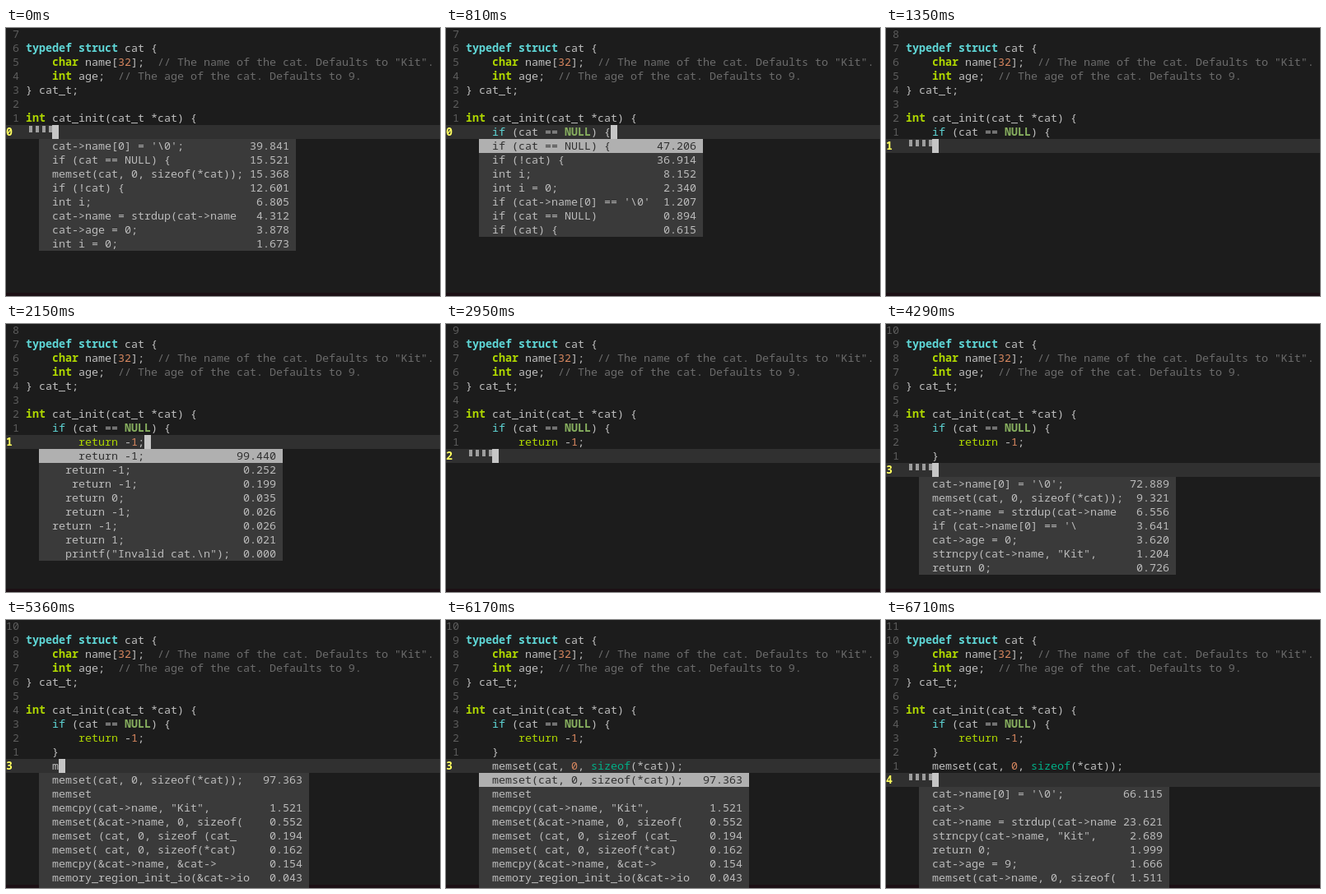
Write an HTML page that moves like this. It is 527x326 px and loops after 8 s.

```html
<!DOCTYPE html>
<html lang="en">
<head>
<meta charset="utf-8">
<title>Code completion</title>
<style>
  html, body { margin: 0; width: 100%; height: 100%; overflow: hidden; background: #1c1c1c; }
  #stage {
    position: relative; width: 527px; height: 326px; overflow: hidden;
    background: #1c1c1c; color: #c0c0c0;
    font: 13.333px/17px "Noto Sans Mono", "DejaVu Sans Mono", monospace;
    font-variant-ligatures: none;
  }
  #stage div { position: absolute; height: 17px; white-space: pre; }
  .status { left: 0; top: 322px; width: 527px; background: #1c1015; }
  .current { left: 0; width: 527px; background: #303030; }
  .num { color: #5c5c5c; }
  .num.now { color: #ffff5f; font-weight: bold; }
  #stage .guide { width: 4px; height: 8px; background: #9e9e9e; }
  .cursor { width: 8px; background: #c6c6c6; }
  .item { background: #3a3a3a; color: #bcbcbc; }
  .item.on { background: #b0b0b0; color: #303030; }
  .decl { color: #5fd7d7; font-weight: bold; }
  .type { color: #afd700; font-weight: bold; }
  .ret { color: #afd700; }
  .cond { color: #5fd7d7; }
  .const { color: #87af5f; font-weight: bold; }
  .op { color: #00af87; }
  .lit { color: #d7875f; }
  .note { color: #6c6c6c; }
</style>
</head>
<body>
<div id="stage"></div>
<script>
const CELL = 8, ROW = 17, TOP = -1, LEFT = 24, LOOP = 8000;
const stage = document.getElementById("stage");

const code = `
typedef struct cat {
    char name[32];  // The name of the cat. Defaults to "Kit".
    int age;  // The age of the cat. Defaults to 9.
} cat_t;

int cat_init(cat_t *cat) {
    if (cat == NULL) {
        return -1;
    }
    memset(cat, 0, sizeof(*cat));`.split("\n");

// col: left edge, cols: width, list: "completion|score"
const menu = (col, cols, text) => ({ col, cols, list: text.split("\n").slice(1) });

const menus = {
  body: menu(2, 39, String.raw`
cat->name[0] = '\0';|39.841
if (cat == NULL) {|15.521
memset(cat, 0, sizeof(*cat));|15.368
if (!cat) {|12.601
int i;|6.805
cat->name = strdup(cat->name|4.312
cat->age = 0;|3.878
int i = 0;|1.673`),
  cond: menu(2, 34, String.raw`
if (cat == NULL) {|47.206
if (!cat) {|36.914
int i;|8.152
int i = 0;|2.340
if (cat->name[0] == '\0'|1.207
if (cat == NULL)|0.894
if (cat) {|0.615`),
  ret: menu(2, 37, String.raw`
    return -1;|99.440
  return -1;|0.252
   return -1;|0.199
  return 0;|0.035
  return -1;|0.026
return -1;|0.026
  return 1;|0.021
  printf("Invalid cat.\n");|0.000`),
  inner: menu(6, 19, `
}|98.127
return 0;|0.412
return;|0.238
exit(1);|0.104`),
  close: menu(2, 36, `
}|99.318
cat->name = strdup("Kit");|0.146
return 0;|0.092
} else {|0.071`),
  after: menu(2, 39, String.raw`
cat->name[0] = '\0';|72.889
memset(cat, 0, sizeof(*cat));|9.321
cat->name = strdup(cat->name|6.556
if (cat->name[0] == '\|3.641
cat->age = 0;|3.620
strncpy(cat->name, "Kit",|1.204
return 0;|0.726`),
  mem: menu(2, 41, `
memset(cat, 0, sizeof(*cat));|97.363
memset|
memcpy(cat->name, "Kit",|1.521
memset(&cat->name, 0, sizeof(|0.552
memset (cat, 0, sizeof (cat_|0.194
memset( cat, 0, sizeof(*cat)|0.162
memcpy(&cat->name, &cat->|0.154
memory_region_init_io(&cat->io|0.043
mem|0.038`),
  next: menu(2, 38, String.raw`
cat->name[0] = '\0';|66.115
cat->|
cat->name = strdup(cat->name|23.621
strncpy(cat->name, "Kit",|2.689
return 0;|1.999
cat->age = 9;|1.666
memset(cat->name, 0, sizeof(|1.511
aaa|1.200`.replace("aaa", "new"))
};

const pad = n => " ".repeat(n);

// time, current row, its text, menu, first item chosen, cursor hidden
const steps = [
  [0, 7, pad(4), "body"],
  [270, 7, "    i", "body"],
  [540, 7, "    i", "cond"],
  [810, 7, code[7], "cond", true],
  [1350, 8, pad(4)],
  [1610, 8, pad(4), "ret"],
  [2150, 8, code[8], "ret", true],
  [2420, 9, pad(8)],
  [2680, 9, pad(8), "inner"],
  [2950, 9, pad(4)],
  [3220, 9, pad(4), "close"],
  [3490, 9, code[9], "close", true],
  [3750, 9, code[9], "close", true, true],
  [4020, 10, pad(4)],
  [4290, 10, pad(4), "after"],
  [5360, 10, "    m", "mem"],
  [5900, 10, code[10], "mem", true],
  [6170, 10, code[10], "mem", true, true],
  [6440, 11, pad(4)],
  [6710, 11, pad(4), "next"]
];

const syntax = [
  ["note", "//.*"],
  ["decl", "\\b(?:typedef|struct)\\b"],
  ["type", "\\b(?:char|int)\\b"],
  ["ret", "\\breturn\\b"],
  ["cond", "\\bif\\b"],
  ["const", "\\bNULL\\b"],
  ["op", "\\bsizeof\\b"],
  ["lit", "\\b\\d+\\b"]
];
const token = new RegExp(syntax.map(([name, re]) => `(?<${name}>${re})`).join("|"), "g");

function add(cls, x, row, text = "", dy = 0) {
  const el = document.createElement("div");
  el.className = cls;
  el.style.left = x + "px";
  el.style.top = TOP + row * ROW + dy + "px";
  el.textContent = text;
  stage.append(el);
  return el;
}

function addCode(row, text) {
  const el = add("code", LEFT, row);
  let end = 0;
  for (const m of text.matchAll(token)) {
    const span = document.createElement("span");
    span.className = Object.keys(m.groups).find(k => m.groups[k]);
    span.textContent = m[0];
    el.append(text.slice(end, m.index), span);
    end = m.index + m[0].length;
  }
  el.append(text.slice(end));
}

function addMenu({ col, cols, list }, row, chosen) {
  list.forEach((entry, i) => {
    const [text, score] = entry.split("|");
    const line = "  " + text.padEnd(cols - 9) + score.padStart(6);
    add(chosen && i === 0 ? "item on" : "item", LEFT + col * CELL, row + i, line)
      .style.width = cols * CELL + "px";
  });
}

function draw([, row, text, menuName, chosen, hidden]) {
  stage.replaceChildren();
  add("status", 0, 19);
  add("current", 0, row);
  for (let r = 0; r < row; r++) {
    add("num", 0, r, String(row - r).padStart(2));
    addCode(r, code[r]);
  }
  add("num now", 0, row, String((row + 3) % 10));
  if (text.trim()) addCode(row, text);
  else for (let i = 0; i < text.length; i++) add("guide", LEFT + i * CELL + 4, row, "", 1);
  if (!hidden) add("cursor", LEFT + text.length * CELL, row);
  if (menuName) addMenu(menus[menuName], row + 1, chosen);
}

let shown;
const start = performance.now();
function tick() {
  const t = (performance.now() - start) % LOOP;
  const step = steps.findLast(s => s[0] <= t);
  if (step !== shown) draw(shown = step);
  requestAnimationFrame(tick);
}
tick();
</script>
</body>
</html>
```
